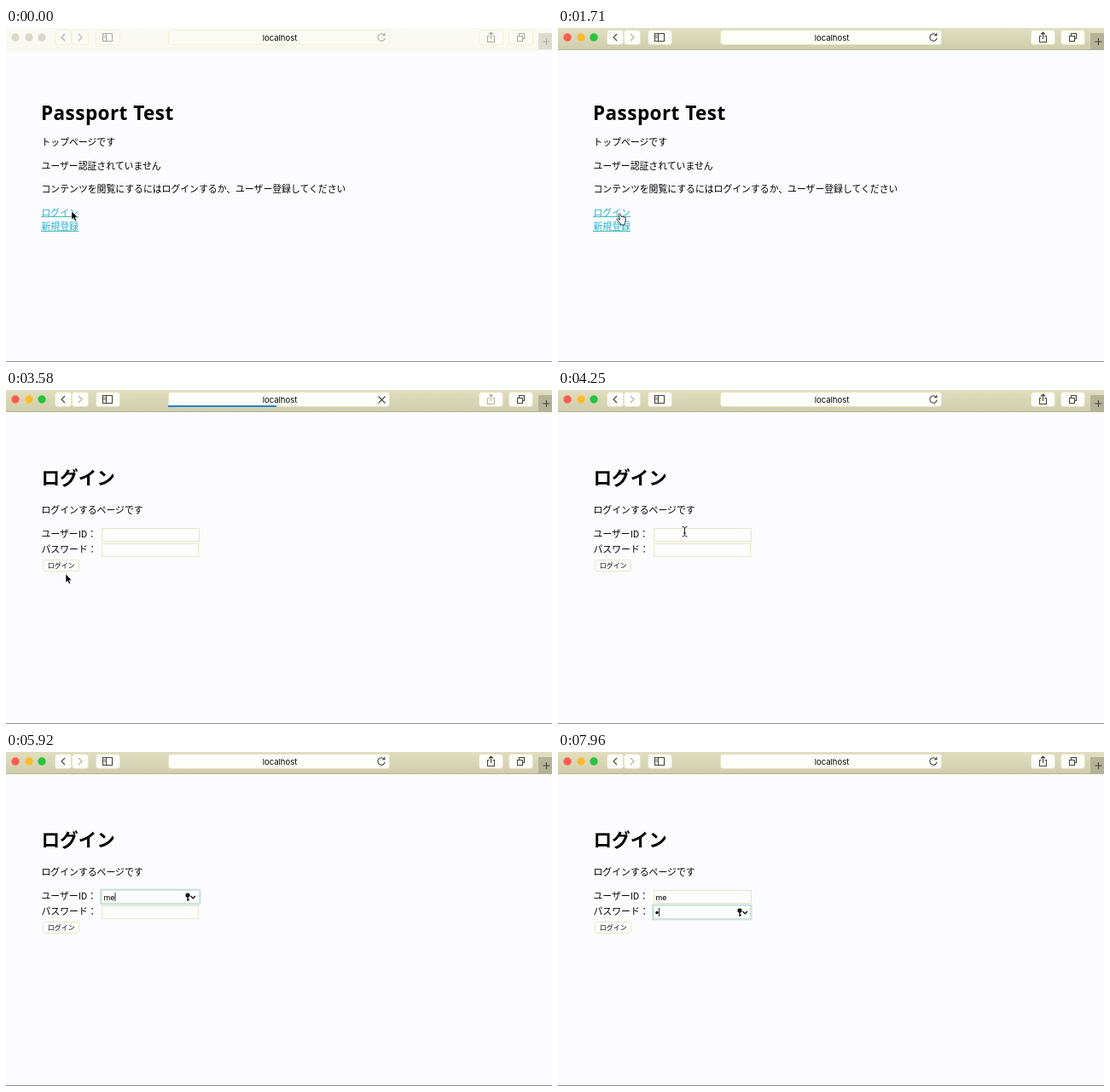
These frames come from a looping animation (640x392 px, 8 s). An HTML page:

```html
<!DOCTYPE html>
<html lang="ja">
<head>
<meta charset="utf-8">
<title>Passport Test</title>
<style>
html, body { margin: 0; width: 100%; height: 100%; overflow: hidden; background: #fcfcff; }
svg { display: block; width: 640px; height: 392px; animation: wake 8s step-end infinite; }

text { font: 500 10.85px "Noto Sans CJK JP", "Noto Sans CJK", sans-serif; fill: #000; }
text.title { font: 700 22.5px "Open Sans", "Noto Sans", sans-serif; letter-spacing: .45px; }
text.heading { font-size: 21.6px; font-weight: 700; }
text.ui { font: 9.5px Inter, "Liberation Sans", sans-serif; }
text.ui.typed { font-size: 9px; }
text.button { font-size: 8px; }
text.link { fill: #20b2d0; }
.underline { fill: #46bcb4; }

.control { fill: var(--control); stroke: var(--edge); stroke-width: 1; }
.icon { fill: none; stroke: var(--ink); stroke-width: 1.1; }
.dim { stroke: #b5b39c; }
.field { fill: #fdfdff; stroke: #e8e6c2; }
.ring { fill: none; stroke: #c6e4e3; stroke-width: 2; }
.glyph { fill: none; stroke: #111; stroke-width: 1.4; }
.caret { fill: #333; }

/* Hard switches between states */
.step { animation: 8s step-end infinite; }
.home { animation-name: home; }
.login { animation-name: login; }
.loading { animation-name: loading; }
.loaded { animation-name: loaded; }
.bar { transform-origin: 190px 0; animation: progress 8s linear infinite; }
.arrow { animation-name: arrow; }
.hand { animation-name: hand; }
.beam { animation-name: beam; }
.focus-id { animation-name: focus-id; }
.focus-pass { animation-name: focus-pass; }
.key-m { animation-name: key-m; }
.key-e { animation-name: key-e; }
.bullet { animation-name: bullet; }
.id-caret { animation-name: id-caret; }
.pass-caret { animation-name: pass-caret; }
.pointer { animation: move 8s ease-in-out infinite; }

@keyframes wake {
  0% { --top: #fafaf4; --bottom: #f9f9f2; --line: #f3f2e6; --control: #fbfbf6; --edge: #f3f1cc;
       --ink: #aaa9a0; --red: #d9d8cd; --amber: #d9d8cd; --green: #d9d8cd; --tab: #dddccc; }
  12%, to { --top: #e1dec0; --bottom: #d0cdad; --line: #b4b296; --control: #fdfdf9; --edge: #e5e2c2;
       --ink: #45443a; --red: #fc5b50; --amber: #fdbb2e; --green: #27c43f; --tab: #b4b297; }
}
@keyframes home { 0% { opacity: 1 } 43%, to { opacity: 0 } }
@keyframes login { 0% { opacity: 0 } 43%, to { opacity: 1 } }
@keyframes loading { 0% { opacity: 0 } 38% { opacity: 1 } 47%, to { opacity: 0 } }
@keyframes loaded { 0% { opacity: 1 } 38% { opacity: 0 } 47%, to { opacity: 1 } }
@keyframes progress {
  0%, 38% { transform: scaleX(.05) }
  43%, 45% { transform: scaleX(.488) }
  46.5%, to { transform: scaleX(1) }
}
@keyframes arrow { 0% { opacity: 1 } 20% { opacity: 0 } 43% { opacity: 1 } 51.5%, to { opacity: 0 } }
@keyframes hand { 0% { opacity: 0 } 20% { opacity: 1 } 43%, to { opacity: 0 } }
@keyframes beam { 0% { opacity: 0 } 51.5% { opacity: 1 } 68%, to { opacity: 0 } }
@keyframes focus-id { 0% { opacity: 0 } 58% { opacity: 1 } 78%, to { opacity: 0 } }
@keyframes focus-pass { 0% { opacity: 0 } 78%, to { opacity: 1 } }
@keyframes key-m { 0% { opacity: 0 } 68%, to { opacity: 1 } }
@keyframes key-e { 0% { opacity: 0 } 71%, to { opacity: 1 } }
@keyframes bullet { 0% { opacity: 0 } 97%, to { opacity: 1 } }
@keyframes id-caret {
  0% { transform: none } 68% { transform: translateX(8px) } 71%, to { transform: translateX(13px) }
}
@keyframes pass-caret { 0% { transform: none } 97%, to { transform: translateX(4px) } }
@keyframes move {
  0%, 1.5% { transform: translate(77px, 215px) }
  7.8%, 12% { transform: translate(190px, 220px) }
  16% { transform: translate(118px, 230px) }
  20.5%, 46% { transform: translate(70px, 216px) }
  52.3%, to { transform: translate(148px, 166px) }
}
</style>
</head>
<body>
<svg viewBox="0 0 640 392">
  <defs>
    <linearGradient id="toolbar" x2="0" y2="1">
      <stop stop-color="var(--top)"/>
      <stop offset="1" stop-color="var(--bottom)"/>
    </linearGradient>
    <g id="keychain">
      <circle cx="213" cy="168" r="2.6" fill="#111"/>
      <path d="M213 169v6M213 173.5h1.8" class="glyph"/>
      <path d="M216.5 169l2.7 2.7 2.7-2.7" class="glyph"/>
    </g>
    <path id="share" d="M566.5 9.5h-2v7h8v-7h-2M568.5 13v-7.5M566 7.5l2.5-2.5 2.5 2.5"/>
  </defs>

  <rect width="640" height="392" fill="#fcfcff"/>

  <g class="toolbar">
    <rect width="640" height="25" fill="url(#toolbar)"/>
    <rect y="25" width="640" height="1" fill="var(--line)"/>
    <circle cx="11" cy="11" r="4.7" fill="var(--red)"/>
    <circle cx="27" cy="11" r="4.7" fill="var(--amber)"/>
    <circle cx="42" cy="11" r="4.7" fill="var(--green)"/>

    <rect class="control" x="57.5" y="2.5" width="19" height="17" rx="3"/>
    <rect class="control" x="77.5" y="2.5" width="19" height="17" rx="3"/>
    <rect class="control" x="105.5" y="2.5" width="28" height="17" rx="3"/>
    <rect class="control" x="190.5" y="2.5" width="259" height="17" rx="3"/>
    <rect class="control" x="554.5" y="2.5" width="28" height="17" rx="3"/>
    <rect class="control" x="589.5" y="2.5" width="28" height="17" rx="3"/>
    <path class="icon" d="M69 7l-4 4 4 4"/>
    <path class="icon dim" d="M85 7l4 4-4 4"/>
    <path class="icon" d="M113.5 6.5h11v9h-11zM117.5 6.5v9M114.5 9h2M114.5 11h2"/>
    <path class="icon" d="M599.5 9.5h6v6h-6zM601.5 9v-2.5h6v6h-2"/>

    <g class="step loaded">
      <path class="icon" d="M443.3 8.3a4.2 4.2 0 1 0 .9 3.4M443.9 5.8v3h-3"/>
      <use href="#share" class="icon"/>
    </g>
    <g class="step loading">
      <path class="icon" d="M436.5 7.5l8 8M444.5 7.5l-8 8"/>
      <use href="#share" class="icon dim"/>
      <rect class="bar" x="190" y="18" width="260" height="2" fill="#2585c9"/>
    </g>
    <text class="ui" x="321" y="15" text-anchor="middle">localhost</text>

    <rect x="624" y="6" width="16" height="19" fill="var(--tab)"/>
    <path class="icon" d="M629.5 16h8M633.5 12v8"/>
  </g>

  <g class="step home">
    <text class="title" x="41" y="107.5">Passport Test</text>
    <text x="41.5" y="138">トップページです</text>
    <text x="41.5" y="165.5">ユーザー認証されていません</text>
    <text x="41.5" y="193">コンテンツを閲覧にするにはログインするか、ユーザー登録してください</text>
    <text class="link" x="41.5" y="220.5">ログイン</text>
    <text class="link" x="41.5" y="237">新規登録</text>
    <rect class="underline" x="41" y="221" width="44" height="1"/>
    <rect class="underline" x="41" y="238" width="44" height="1"/>
  </g>

  <g class="step login">
    <text class="heading" x="41.5" y="111">ログイン</text>
    <text x="41.5" y="145">ログインするページです</text>
    <text x="41.5" y="173">ユーザーID：</text>
    <text x="41.5" y="191">パスワード：</text>
    <rect class="field" x="112.5" y="162.5" width="114" height="15"/>
    <rect class="field" x="112.5" y="180.5" width="113" height="15"/>
    <rect class="field" x="43.5" y="199.5" width="42" height="13" rx="2.5"/>
    <text class="button" x="48.8" y="209">ログイン</text>

    <text class="ui typed step key-m" x="114.5" y="173.5">m</text>
    <text class="ui typed step key-e" x="122.3" y="173.5">e</text>
    <circle class="step bullet" cx="116" cy="188.5" r="1.7"/>

    <g class="step focus-id">
      <rect class="ring" x="111" y="161.5" width="116.5" height="17" rx="1"/>
      <rect class="caret step id-caret" x="114.5" y="165" width="1" height="10"/>
      <use href="#keychain"/>
    </g>
    <g class="step focus-pass">
      <rect class="ring" x="111" y="179.5" width="115.5" height="17" rx="1"/>
      <rect class="caret step pass-caret" x="114" y="183" width="1" height="10"/>
      <use href="#keychain" y="18"/>
    </g>
  </g>

  <g class="pointer">
    <path class="step arrow" d="M0 0v10l2.3-2.1 1.6 3.7 1.7-.8-1.6-3.6h3z" fill="#000" stroke="#fff" stroke-width=".5"/>
    <path class="step hand" d="M1.3 3.4c-.4-1.6 1.6-2 2-.5l1 3c.4-1 1.5-.8 1.8 0 .5-.7 1.5-.4 1.7.4 1.2-.4 1.6.6 1.6 1.7 0 3-.8 4-1.2 5.500v1.500H3.400v-1.300C2 12-.2 10.200-.8 8.800c-.4-1.200 1-1.500 2-.5l1.300 1z" fill="#fff" stroke="#111" stroke-width=".9"/>
    <path class="step beam" d="M-2.5-5.5Q0-5.5.5-4 1-5.5 3.5-5.5M.5-4v9M-2.5 6Q0 6 .5 4.5 1 6 3.5 6M-1 2h3" fill="none" stroke="#222"/>
  </g>

  <rect y="391" width="640" height="1" fill="#8d8d88"/>
</svg>
</body>
</html>
```
